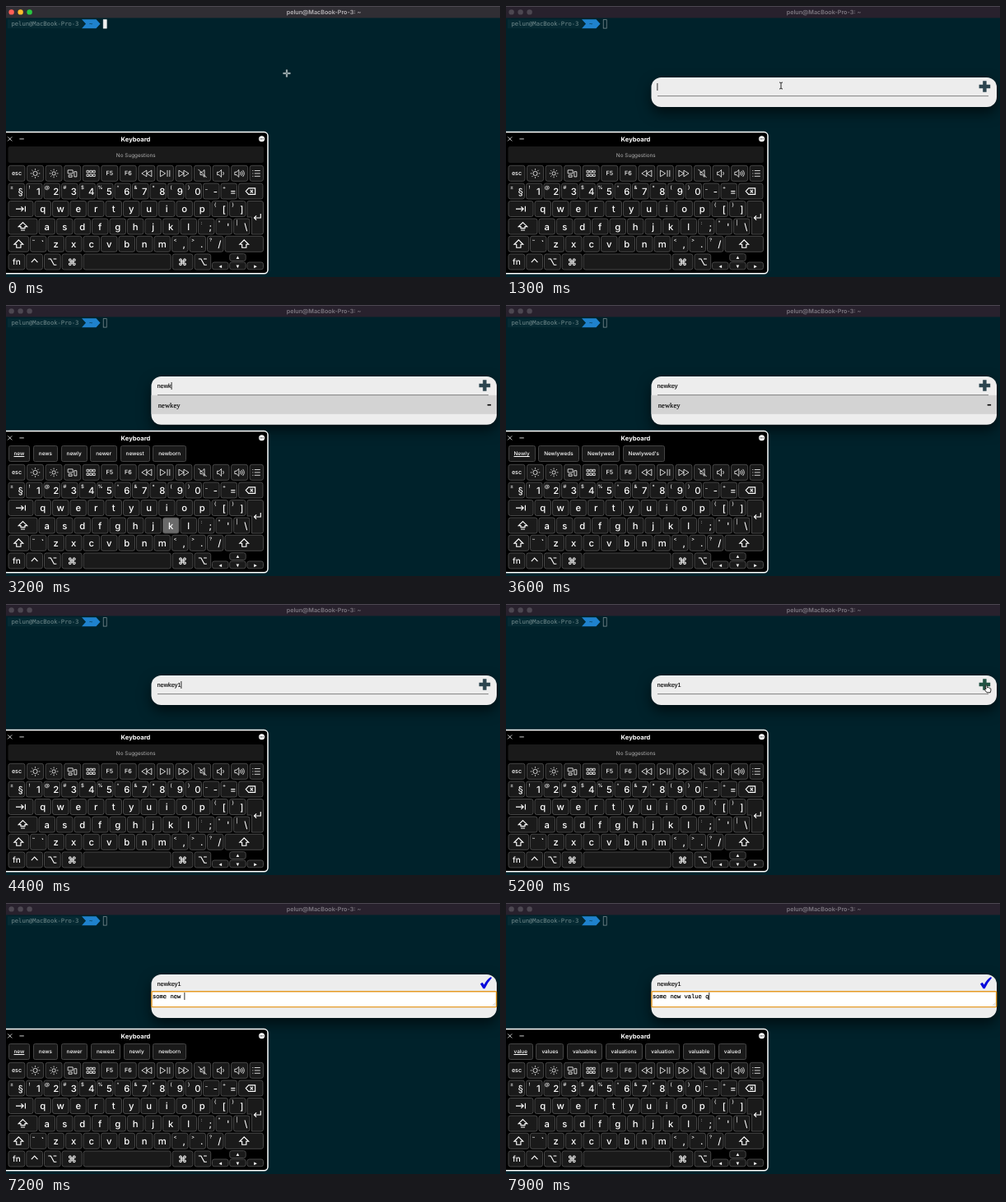
An HTML page that plays this animation: 600 by 330 pixels, repeating every 8000 ms.

```html
<!DOCTYPE html>
<html lang="en">
<head>
<meta charset="utf-8">
<title>Key store popup</title>
<style>
  html, body { margin: 0; width: 100%; height: 100%; overflow: hidden; background: #00222b; }
  svg { position: absolute; left: 0; top: 0; width: 600px; height: 330px; }
  text { font-family: Inter, Roboto, sans-serif; fill: #fff; white-space: pre; text-rendering: geometricPrecision; }
  .mid { text-anchor: middle; }
  .cap { font-weight: 500; text-anchor: middle; }
  .mono { font-family: "DejaVu Sans Mono", monospace; font-size: 7.17px; }
  .sym { font-family: "DejaVu Sans", sans-serif; stroke: #fff; stroke-width: .25; }
  .input { font: 7.35px "Liberation Sans", Arial, sans-serif; fill: #000; stroke: #000; stroke-width: .12; }
  .row { font: 8.6px "Liberation Serif", serif; fill: #000; stroke: #000; stroke-width: .12; }
  .area { font: 7.13px "Liberation Mono", monospace; fill: #000; stroke: #000; stroke-width: .2; }
  .key { fill: #1a1a1a; stroke: #4d4d4d; stroke-width: .9; }
  .key.down { fill: #6a6a6a; }
  .icon { fill: none; stroke: #fff; stroke-width: .8; stroke-linejoin: round; }
  .bold { stroke-width: 1.15; stroke-linejoin: miter; }
  #popup { filter: drop-shadow(0 7px 8px rgba(0, 0, 0, .6)); }
  #chips { position: absolute; left: 2.5px; top: 171px; display: flex; gap: 3.5px;
           font: 500 6.4px/18px Inter, Roboto, sans-serif; color: #fff; text-rendering: geometricPrecision; }
  #chips span { padding: 0 6px; height: 18px; background: #1a1a1a;
                border: 1px solid #444; border-radius: 2.5px; }
  #chips span:first-child { text-decoration: underline; }
</style>
</head>
<body>
<svg id="stage" viewBox="0 0 600 330"></svg>
<div id="chips"></div>
<script>
const LOOP = 8000, TICK = 100;
const HOST = 'pelun@MacBook-Pro-3';
const stage = document.getElementById('stage');
const chips = document.getElementById('chips');

function el(tag, attrs, parent = stage, text) {
  const node = document.createElementNS('http://www.w3.org/2000/svg', tag);
  for (const k in attrs) node.setAttribute(k, attrs[k]);
  if (text !== undefined) node.textContent = text;
  return parent.appendChild(node);
}
const set = (node, attrs) => { for (const k in attrs) node.setAttribute(k, attrs[k]); };
const show = (node, on) => { node.style.display = on ? '' : 'none'; };
const rect = (x, y, width, height, attrs, parent) => el('rect', { x, y, width, height, ...attrs }, parent);
const path = (d, attrs, parent) => el('path', { d, ...attrs }, parent);
const label = (x, y, text, attrs, parent) => el('text', { x, y, ...attrs }, parent, text);

// Terminal window
const bar = rect(0, 0, 600, 14.5, {});
rect(0, 0, 600, .8, { fill: '#55525a' });
const lights = ['#ff5f57', '#febc2e', '#28c840'].map((color, i) =>
  ({ color, node: el('circle', { cx: 6.6 + 11 * i, cy: 7.4, r: 3.2 }) }));
const title = label(386, 10, HOST + ': ~', { class: 'mid', 'font-size': 7.2, 'font-weight': 600 });
path('M2 16.3H92L97 21.8L92 27.3H2Z', { fill: '#062a33' });
path('M92 16.3H109.5L114.5 21.8L109.5 27.3H92L97 21.8Z', { fill: '#1f82cd' });
label(6.5, 24.4, HOST, { class: 'mono', style: 'fill:#748c8e' });
label(101, 24.4, '~', { class: 'mono', style: 'fill:#06303c' });
const block = rect(118.2, 16.7, 4, 10.4, { 'stroke-width': .7 });

// Popup
const popup = el('g', { id: 'popup' });
const panel = rect(176.5, 87, 419.5, 36, { rx: 12, fill: '#ededed' }, popup);
const hilite = rect(176.5, 109.8, 419.5, 23, { fill: '#d3d3d3' }, popup);
path('M184 109.6H586', { stroke: '#666', 'stroke-width': .8 }, popup);
const input = label(183.5, 100.6, '', { class: 'input' }, popup);
const rows = [0, 1].map(i => {
  const g = el('g', {}, popup), y = 22.8 * i;
  const text = label(184.8, 124.6 + y, '', { class: 'row' }, g);
  rect(584.7, 120.9 + y, 4.4, 1.6, { fill: '#000' }, g);
  return { g, text };
});
const plus = path('M579.2 91.3h4.4v4.5h4.6v4.4h-4.6v4.5h-4.4v-4.5h-4.6v-4.4h4.6z', {}, popup);
const check = path('M576 98.6L578.6 96.7L580.8 99.4Q583.6 93.4 589 90L590 91.2Q585 96.5 581.6 104.3H579.6Z',
  { fill: '#0808dc' }, popup);
const editor = el('g', {}, popup);
const box = rect(177, 107.8, 418.6, 18.8, { fill: '#fff', rx: .8 }, editor);
path('M591 125.2L594.6 121.6M593 125.2L594.6 123.6', { stroke: '#999', 'stroke-width': .5 }, editor);
const area = label(178, 116, '', { class: 'area' }, editor);
const caret = rect(0, 0, .8, 9, { fill: '#000' }, popup);

// On-screen keyboard
const board = el('g', {});
rect(-4, 153.6, 322, 172.2, { rx: 4.5, fill: '#000', stroke: '#fff', 'stroke-width': 1.5 }, board);
path('M2.2 159.4l5 5m0-5l-5 5M16.4 161.9h5.4', { class: 'icon' }, board);
label(157.5, 164.8, 'Keyboard', { class: 'mid', 'font-size': 7.6, 'font-weight': 700 }, board);
el('circle', { cx: 310.6, cy: 161.8, r: 3.5, fill: '#fff' }, board);
for (const x of [308.9, 310.6, 312.3]) el('circle', { cx: x, cy: 161.8, r: .6, fill: '#000' }, board);
const noSug = el('g', {}, board);
rect(2.5, 171, 310.5, 20, { rx: 2.5, fill: '#1a1a1a' }, noSug);
label(157.8, 183.5, 'No Suggestions', { class: 'mid', 'font-size': 6.4, style: 'fill:#b0b0b0' }, noSug);

const keys = {};
const key = (id, x, y, w, h = 19) => keys[id] = rect(x, y, w, h, { rx: 2.5, class: 'key' }, board);
function textKey(id, x, y, w, text, size, cls = '') {
  key(id, x, y, w);
  label(x + w / 2, y + 9.6 + size * .36, text, { class: 'cap ' + cls, 'font-size': size }, board);
}
function iconKey(id, x, y, w, d, cls = 'bold') {
  key(id, x, y, w);
  path(d, { class: 'icon ' + cls, transform: `translate(${x + w / 2} ${y + 9.6})` }, board);
}
// Each entry is one character, or a shifted symbol followed by the plain one.
function keyRow(list, x, y) {
  list.split(' ').forEach((s, i) => {
    const kx = x + 21.5 * i;
    if (s.length === 1) return textKey(s, kx, y, 19.5, s, 11.3);
    key(s[1], kx, y, 19.5);
    label(kx + 4, y + 6.8, s[0], { class: 'cap', 'font-size': 6 }, board);
    label(kx + 14.8, y + 14, s[1], { class: 'cap', 'font-size': 11.3 }, board);
  });
}
const rays = r => Array.from({ length: 8 }, (_, i) => {
  const c = Math.cos(i * Math.PI / 4), s = Math.sin(i * Math.PI / 4);
  return `M${c * r} ${s * r}L${c * (r + 1.6)} ${s * (r + 1.6)}`;
}).join('');
const sun = r => `M${-r} 0a${r} ${r} 0 1 0 ${2 * r} 0a${r} ${r} 0 1 0 ${-2 * r} 0` + rays(r + 1.6);
const speaker = x => `M${x - 5} -1.7h2.2L${x} -4.4v8.8L${x - 2.8} 1.7h-2.2z`;
const tiles = [-5.2, -1.4, 2.4].map(x => `M${x} -3.6h2.6v2.6h-2.6zM${x} 1h2.6v2.6h-2.6z`).join('');
const glyph = {
  shift: 'M0-5L5.4.4H2.6V4.4H-2.6V.4H-5.4Z',
  caps: 'M0-5L5.2 0H2.5V2H-2.5V0H-5.2ZM-2.5 4.4H2.5',
  tab: 'M-6 0H3.2M.4-2.8L3.2 0L.4 2.8M5.4-3.4V3.4',
  del: 'M-6 0L-2.6-3.8H5.4V3.8H-2.6ZM-.6-1.7L2.8 1.7M2.8-1.7L-.6 1.7',
  ctrl: 'M-3.8 .5L0-3.5L3.8 .5',
  opt: 'M-5-3.6H-2L2 3.6H5M1.2-3.6H5',
  enter: 'M4-4V1H-3.6M-1.2-1.6L-3.8 1L-1.2 3.6'
};
const fnRow = [
  'esc', [sun(2.6)], [sun(2.1)], ['M-5.5-4h6v4h-6zM-4.5 2h4v2.4h-4zM2.2-2.2h3v6.2h-3z'], [tiles],
  'F5', 'F6', ['M0-3.8v7.6L-6 0zM6-3.8v7.6L0 0z'], ['M-6-3.8v7.6L.2 0zM2.6-4v8M5.4-4v8'],
  ['M0-3.8v7.6L6 0zM-6-3.8v7.6L0 0z'], [speaker(2.5) + 'M-5-5L5 5'],
  [speaker(.5) + 'M2.5-2q1.8 2 0 4'], [speaker(-.8) + 'M.8-1.8q1.6 1.8 0 3.6M2.4-3q2.6 3 0 6M4-4q3.4 4 0 8'],
  ['M-2.5-3.4h7M-2.5 0h7M-2.5 3.4h7M-5-3.4h1M-5 0h1M-5 3.4h1']
];
fnRow.forEach((k, i) => {
  const x = 3 + 22.55 * i, w = i === 13 ? 16.3 : 20;
  if (typeof k === 'string') textKey(k, x, 194.3, w, k, 7.2);
  else iconKey('fn' + i, x, 194.3, w, k[0], '');
});
keyRow('±§ !1 @2 #3 $4 %5 ^6 &7 *8 (9 )0 _- +=', 3, 216);
iconKey('del', 282.5, 216, 29.5, glyph.del);
iconKey('tab', 3, 237.5, 30, glyph.tab);
keyRow('q w e r t y u i o p {[ }]', 35, 237.5);
path('M295 237.5H310Q312.5 237.5 312.5 240V275.5Q312.5 278 310 278H298.5V257H293V239.5Q293 237.5 295 237.5Z',
  { class: 'key' }, board);
path(glyph.enter, { class: 'icon bold', transform: 'translate(305.3 257)' }, board);
iconKey('caps', 3, 259, 35, glyph.caps);
keyRow('a s d f g h j k l :; "\' |\\', 40, 259);
iconKey('shift', 3, 280.3, 24.7, glyph.shift);
keyRow('~` z x c v b n m <, >. ?/', 29.5, 280.3);
iconKey('shiftR', 266, 280.3, 46.5, glyph.shift);
textKey('fn', 3, 302, 19.8, 'fn', 10);
iconKey('ctrl', 24.8, 302, 19.7, glyph.ctrl);
iconKey('opt', 46.5, 302, 19.7, glyph.opt);
textKey('cmd', 68.2, 302, 24, '⌘', 11, 'sym');
key('space', 94.2, 302, 106);
textKey('cmdR', 202.3, 302, 24.5, '⌘', 11, 'sym');
iconKey('optR', 229, 302, 19.7, glyph.opt);
[['left', 250.5, 312, '◂'], ['up', 271.7, 301.7, '▴'], ['down', 271.7, 312, '▾'], ['right', 293, 312, '▸']]
  .forEach(([id, x, y, s]) => {
    key(id, x, y, 19.5, 8.8);
    label(x + 9.8, y + 6.6, s, { class: 'mid sym', 'font-size': 6.5 }, board);
  });

// Mouse pointers
const pointers = {
  cross: 'M-.6-4.2h1.2v3.6h3.6v1.2h-3.6v3.6h-1.2v-3.6h-3.6v-1.2h3.6z',
  beam: 'M-2-4Q0-4 0-2.8Q0-4 2-4M0-2.8V2.8M-2 4Q0 4 0 2.8Q0 4 2 4',
  hand: 'M-2.8-4Q-1.8-5-1.2-3.8L-.4-1Q.4-2 1-.9Q1.8-1.6 2.4-.5Q3.6-.8 3.8.4Q4.2 2.6 3.2 4.8H-1L-4 1Q-3.6-.2-2 .9Z'
};
const looks = {
  cross: { fill: '#1c3c44', stroke: '#e4e8e8', 'stroke-width': .7 },
  beam: { fill: 'none', stroke: '#111', 'stroke-width': .9 },
  hand: { fill: '#fff', stroke: '#111', 'stroke-width': .9 }
};
const mouse = path('', {});

// Timeline: every entry changes part of the state from its time on.
const start = { active: true, down: '', open: false, input: '', caret: '', list: [], sug: [],
  icon: 'plus', edit: false, ring: false, area: '', mouse: 'cross' };
const both = ['new awesome key', 'newkey'];
const steps = [
  [100, { down: 'shift cmd' }],
  [300, { active: false }],
  [400, { down: '', open: true, caret: 'input' }],
  [900, { mouse: 'beam', caret: '' }],
  [1100, { caret: 'input' }],
  [1500, { caret: '' }],
  [1700, { caret: 'input' }],
  [2000, { input: 'n', down: 'n', list: both, mouse: '' }],
  [2100, { input: 'ne', down: 'e' }],
  [2200, { input: 'new', down: '' }],
  [2400, { caret: '', sug: ['new', 'news', 'newly', 'newer', 'newest', 'newborn'] }],
  [2700, { caret: 'input' }],
  [2900, { caret: '' }],
  [3200, { input: 'newk', down: 'k', caret: 'input', list: ['newkey'] }],
  [3300, { input: 'newke', down: 'e' }],
  [3400, { input: 'newkey', down: 'y' }],
  [3500, { down: '', sug: ['Newly', 'Newlyweds', 'Newlywed', "Newlywed's"] }],
  [3600, { caret: '' }],
  [3900, { caret: 'input' }],
  [4100, { input: 'newkey1', down: '1', list: [] }],
  [4300, { down: '' }],
  [4400, { sug: [] }],
  [4700, { caret: '', mouse: 'beam' }],
  [4900, { caret: 'input' }],
  [5100, { caret: '', mouse: 'hand', icon: 'hover' }],
  [5400, { icon: 'check', edit: true }],
  [5700, { mouse: 'beam' }],
  [5900, { ring: true, caret: 'area' }],
  [6100, { caret: '' }],
  [6300, { mouse: '' }],
  [6400, { area: 's', down: 's', caret: 'area' }],
  [6500, { area: 'some', down: 'e' }],
  [6600, { area: 'some ', down: 'space' }],
  [6700, { area: 'some new', down: 'w' }],
  [6800, { area: 'some new ', down: '' }],
  [7000, { caret: '', sug: ['new', 'news', 'newer', 'newest', 'newly', 'newborn'] }],
  [7200, { caret: 'area' }],
  [7400, { area: 'some new v', down: 'v' }],
  [7500, { area: 'some new va', down: 'a' }],
  [7600, { area: 'some new valu', down: 'u' }],
  [7700, { area: 'some new value', down: 'e',
    sug: ['value', 'values', 'valuables', 'valuations', 'valuation', 'valuable', 'valued'] }],
  [7800, { area: 'some new value ', down: 'space' }],
  [7900, { area: 'some new value q', down: '' }]
];
const route = [[0, 341, 82], [800, 341, 82], [1300, 334, 97], [4700, 334, 97],
  [5100, 585, 103], [5500, 585, 103], [5900, 458, 117], [LOOP, 458, 117]];

function place(t) {
  const i = route.findIndex(p => p[0] > t), [t0, x0, y0] = route[i - 1], [t1, x1, y1] = route[i];
  const p = (t - t0) / (t1 - t0), e = p * p * (3 - 2 * p);
  return [x0 + (x1 - x0) * e, y0 + (y1 - y0) * e];
}

function draw(t) {
  const s = Object.assign({}, start, ...steps.filter(p => p[0] <= t).map(p => p[1]));
  set(bar, { fill: s.active ? '#302e34' : '#28212d' });
  lights.forEach(l => set(l.node, { fill: s.active ? l.color : '#4c4751' }));
  title.style.fill = s.active ? '#b8b5b9' : '#7d7881';
  set(block, s.active ? { fill: '#f0f0f0', stroke: '#f0f0f0' } : { fill: 'none', stroke: '#8a9a9d' });

  show(popup, s.open);
  set(panel, { height: s.edit ? 53 : 36 + 22.7 * s.list.length });
  show(hilite, s.list.length);
  input.textContent = s.input;
  rows.forEach((r, i) => { show(r.g, i < s.list.length); r.text.textContent = s.list[i] || ''; });
  show(plus, s.icon !== 'check');
  show(check, s.icon === 'check');
  set(plus, { fill: s.icon === 'hover' ? '#225243' : '#2c444e' });
  show(editor, s.edit);
  set(box, s.ring ? { stroke: '#e59a25', 'stroke-width': 1.4 } : { stroke: '#888', 'stroke-width': .6 });
  area.textContent = s.area;
  show(caret, s.caret);
  if (s.caret === 'area') set(caret, { x: 178 + area.getComputedTextLength(), y: 109 });
  else if (s.caret) set(caret, { x: 183.5 + input.getComputedTextLength(), y: 94 });

  const down = s.down.split(' ');
  for (const id in keys) keys[id].classList.toggle('down', down.includes(id));
  show(noSug, !s.sug.length);
  chips.replaceChildren(...s.sug.map(word => {
    const chip = document.createElement('span');
    chip.textContent = word;
    return chip;
  }));

  show(mouse, s.mouse);
  if (s.mouse) set(mouse, { d: pointers[s.mouse], transform: `translate(${place(t)})`, ...looks[s.mouse] });
}

let last = -1;
const begin = performance.now();
function loop() {
  const t = Math.floor((performance.now() - begin) % LOOP / TICK) * TICK;
  if (t !== last) draw(last = t);
  requestAnimationFrame(loop);
}
loop();
</script>
</body>
</html>
```
